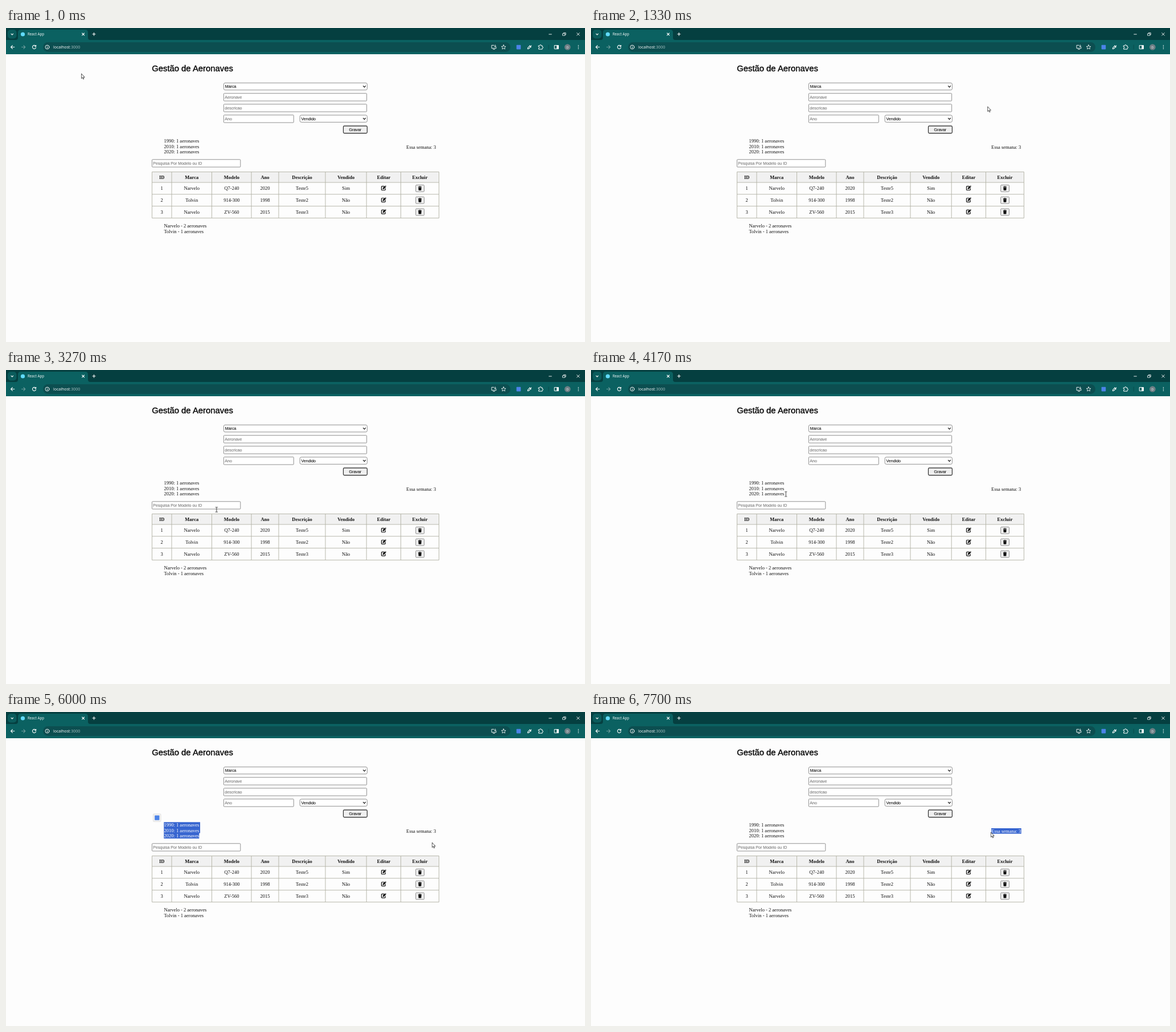
An HTML page that plays this animation: 1017x551 px, repeating every 8000 ms.

```html
<!DOCTYPE html>
<html lang="pt">
<head>
<meta charset="utf-8">
<title>Gestão de Aeronaves</title>
<style>
html, body { margin: 0; width: 100%; height: 100%; overflow: hidden; background: #fdfdfd; }
svg { display: block; }
#stage { width: 1017px; height: 551px; }
text { white-space: pre; }
.ui { font-family: "Open Sans", "Noto Sans", sans-serif; fill: #fff; }
.serif { font: 8.5px "Liberation Serif", "Times New Roman", serif; fill: #111; }
.form { font: 7.07px "Liberation Sans", Arial, sans-serif; fill: #111; stroke: #111; stroke-width: .1; }
.form .hint { fill: #777; stroke: #777; }
.title { font: 14.84px "Liberation Sans", Arial, sans-serif; fill: #000; stroke: #000; stroke-width: .35; }
.mid { text-anchor: middle; }
.head { font-weight: bold; }
.line { fill: none; stroke: #fff; stroke-linecap: round; stroke-linejoin: round; }
.field { fill: #fff; stroke: #858585; stroke-width: .9; }
.picked { fill: #fff; }

#pointer, #arrow, #beam, #chip, .sel, #block { animation: 8s linear infinite; }
#pointer { animation-name: travel; }
#arrow { animation-name: arrow; animation-timing-function: step-end; }
#beam { animation-name: beam; animation-timing-function: step-end; }
#chip { animation-name: chip; animation-timing-function: step-end; }
#block { animation-name: block; animation-timing-function: step-end; }
#sel1 { animation-name: sel1; }
#sel2 { animation-name: sel2; }
#sel3 { animation-name: sel3; }
#week { animation-name: week; }

@keyframes travel {
  0%, .375% { transform: translate(132px, 80px); animation-timing-function: cubic-bezier(.45, 0, .65, .9); }
  7.875% { transform: translate(584px, 125px); animation-timing-function: ease-out; }
  10.375%, 12.5% { transform: translate(613px, 128px); animation-timing-function: ease-in-out; }
  20.375%, 24.125% { transform: translate(766px, 146px); animation-timing-function: ease-in; }
  26.625% { transform: translate(778px, 129px); animation-timing-function: ease-out; }
  30%, 32.875% { transform: translate(786px, 126px); animation-timing-function: cubic-bezier(.45, 0, .65, .9); }
  40.875% { transform: translate(370px, 245px); animation-timing-function: ease-out; }
  42.875%, 43.375% { transform: translate(352px, 240px); animation-timing-function: ease-in-out; }
  53.375%, 53.75% { transform: translate(342px, 217px); }
  58.5% { transform: translate(279px, 198px); animation-timing-function: ease-out; }
  59.125%, 64.625% { transform: translate(273px, 195px); animation-timing-function: ease-in-out; }
  73.375%, 75% { transform: translate(748px, 229px); animation-timing-function: ease-in-out; }
  80% { transform: translate(764px, 222px); animation-timing-function: ease-in-out; }
  85%, 85.5% { transform: translate(757px, 209px); }
  90.875%, 93.375% { transform: translate(703px, 210px); }
  93.75%, 100% { transform: translate(702px, 211px); }
}
@keyframes arrow {
  0% { opacity: 1; }
  40% { opacity: 0; }
  45% { opacity: 1; }
  51.5% { opacity: 0; }
  58.5% { opacity: 1; }
  85% { opacity: 0; }
  90.5%, 100% { opacity: 1; }
}
@keyframes beam {
  0% { opacity: 0; }
  40% { opacity: 1; }
  45% { opacity: 0; }
  51.5% { opacity: 1; }
  58.5% { opacity: 0; }
  85% { opacity: 1; }
  90.5%, 100% { opacity: 0; }
}
@keyframes chip {
  0% { opacity: 0; }
  62.5% { opacity: 1; }
  84.5%, 100% { opacity: 0; }
}
@keyframes block {
  0% { opacity: 0; }
  53.75% { opacity: 1; }
  84.5%, 100% { opacity: 0; }
}
@keyframes sel3 {
  0%, 53.75% { transform: translateX(65px); }
  55.37% { transform: translateX(43px); }
  55.375%, 100% { transform: none; }
}
@keyframes sel2 {
  0%, 55.37% { transform: translateX(65px); }
  55.375% { transform: translateX(43px); }
  57% { transform: translateX(21px); }
  57.005%, 100% { transform: none; }
}
@keyframes sel1 {
  0%, 57% { transform: translateX(65px); }
  57.005% { transform: translateX(21px); }
  58.5%, 100% { transform: none; }
}
@keyframes week {
  0%, 85.5% { transform: translateX(53px); }
  90.5%, 100% { transform: none; }
}
</style>
</head>
<body>
<svg id="stage" viewBox="0 0 1017 551">
  <defs>
    <g id="caret"><path d="M-2.3 -1.2 0 1.2 2.3 -1.2" fill="none" stroke="#111" stroke-width="1.2"/></g>
    <g id="edit">
      <path d="M1-3.2H-2.8Q-3.8-3.2-3.8-2.2V2.6Q-3.8 3.6-2.8 3.6H2Q3 3.6 3 2.6V.4" fill="none" stroke="#111" stroke-width="1.2"/>
      <path d="M-1.8 1.8-1.4-.5 2.1-4 4.2-1.9.6 1.5Z" fill="#111"/>
      <path d="M2.7-4.4Q3.3-4.9 4-4.2T4.6-2.4Z" fill="#111"/>
    </g>
    <g id="trash">
      <rect x="-7.3" y="-5.8" width="14.8" height="11.8" rx="1.2" fill="#efefef" stroke="#858585" stroke-width=".9"/>
      <path d="M-3.1-3.1H-1.2L-.7-3.8H.7L1.2-3.1H3.1V-2.2H-3.1ZM-2.7-1.8H2.7L2.4 3Q2.3 3.7 1.6 3.7H-1.6Q-2.3 3.7-2.4 3Z" fill="#111"/>
    </g>
    <g id="years">
      <text x="277.5" y="201">1990: 1 aeronaves</text>
      <text x="277.5" y="210.6">2010: 1 aeronaves</text>
      <text x="277.5" y="220">2020: 1 aeronaves</text>
    </g>
    <text id="total" x="703.3" y="211.6">Essa semana: 3</text>
    <clipPath id="blockClip">
      <rect class="sel" id="sel1" x="276.5" y="193" width="65" height="9.8"/>
      <rect class="sel" id="sel2" x="276.5" y="202.8" width="65" height="9.6"/>
      <rect class="sel" id="sel3" x="276.5" y="212.4" width="65" height="10"/>
    </clipPath>
    <clipPath id="weekClip"><rect class="sel" id="week" x="703" y="203" width="53" height="12"/></clipPath>
  </defs>

  <rect width="1017" height="551" fill="#fdfdfd"/>

  <!-- browser window -->
  <rect width="1017" height="46" fill="#0b6161"/>
  <rect width="1017" height="21" fill="#053f40"/>
  <rect x="3" y="3" width="15.5" height="15.5" rx="5" fill="#0b5c5c"/>
  <path d="M17 21Q21 21 21 17V8Q21 3 26 3H139Q144 3 144 8V17Q144 21 148 21Z" fill="#0b6161"/>
  <circle cx="29.5" cy="11" r="3.6" fill="#61dafb"/>
  <rect x="65" y="25" width="821" height="17" rx="8.5" fill="#0c4e50"/>
  <g class="ui">
    <text x="38" y="13.3" font-size="6.2">React App</text>
    <text x="83" y="36" font-size="7">localhost<tspan fill="#a9c4c4">:3000</tspan></text>
  </g>
  <g class="line" stroke-width="1.1">
    <path d="M9 10.2 10.8 12 12.6 10.2"/>
    <path d="M133.7 9 137.5 12.8M137.5 9 133.7 12.8M152 10.7H157M154.5 8.2V13.2"/>
    <path d="M953.7 11H958.3M1002.7 8.5 1007.3 13.1M1007.3 8.5 1002.7 13.1" stroke-width=".9"/>
    <path d="M978 9.8H981.8V13.2H978ZM979.3 9.5V8.4H983.2V12H982" stroke-width=".8"/>
    <path d="M14.8 33.5H8.8M11.4 30.7 8.6 33.5 11.4 36.3"/>
    <path d="M27.5 33.5H33.5M30.9 30.7 33.7 33.5 30.9 36.3" stroke="#6d9c9c" style="stroke:#6d9c9c"/>
    <path d="M52.2 31.8A3.1 3.1 0 1 0 52.6 34.2M52.7 30.2V32.3H50.5"/>
    <circle cx="72.5" cy="33.5" r="3.5" stroke-width=".9"/>
    <path d="M72.5 33.3V35.3M72.5 31.7V31.8" stroke-width=".9"/>
    <path d="M857 30.3H853V35.6H861V33.8M855.5 37.4H858.6M859.3 29.8V33M857.8 31.8 859.3 33.3 860.8 31.8" stroke-width=".9"/>
    <path d="M874 29.6 875.1 32.2 877.9 32.4 875.8 34.3 876.4 37 874 35.6 871.6 37 872.2 34.3 870.1 32.4 872.9 32.2Z" stroke-width=".8"/>
    <path d="M916.3 36.7 916.7 34.7 920 31.4 921.6 33 918.3 36.3ZM919.5 30.8 922.2 33.5M921.4 32.2 922.7 30.8" stroke-width="1.1"/>
    <path d="M935.6 31H937.6Q937.6 29.4 938.8 29.4T940 31H942V33Q943.4 33 943.4 34.2T942 35.4V37.2H935.6V35.2Q937 35.2 937 34T935.6 32.8Z" stroke-width="1"/>
    <path d="M963.6 30.5H970.4V36.7H963.6Z" stroke-width="1"/>
  </g>
  <rect x="967.2" y="30.5" width="3.4" height="6.2" fill="#fff"/>
  <rect x="896.6" y="29.8" width="7.6" height="7.6" rx=".8" fill="#4c83e8"/>
  <rect x="952.7" y="29.5" width=".9" height="8" fill="#0a4a4b"/>
  <circle cx="986.3" cy="33.5" r="5.3" fill="#6f7f86"/>
  <text class="ui mid" x="986.3" y="35.5" font-size="5.5">D</text>
  <g fill="#fff"><circle cx="1005.4" cy="30.7" r=".8"/><circle cx="1005.4" cy="33.5" r=".8"/><circle cx="1005.4" cy="36.3" r=".8"/></g>

  <!-- form -->
  <text class="title" x="256.2" y="76.4">Gestão de Aeronaves</text>
  <g class="field">
    <rect x="382.4" y="96.4" width="252" height="12.4" rx="2.5"/>
    <rect x="382.4" y="114.7" width="251.2" height="13.3" rx="1"/>
    <rect x="382.4" y="133.7" width="251.2" height="13.3" rx="1"/>
    <rect x="382.4" y="152.7" width="122.9" height="13.3" rx="1"/>
    <rect x="516.2" y="152.9" width="118.2" height="12.4" rx="2.5"/>
    <rect x="256.5" y="230.8" width="155.3" height="13.2" rx="1"/>
  </g>
  <rect x="592.5" y="171.9" width="41.9" height="12.7" rx="1.8" fill="#efefef" stroke="#222" stroke-width="1.1"/>
  <use href="#caret" x="629.5" y="102.6"/>
  <use href="#caret" x="629.5" y="159.1"/>
  <g class="form">
    <text x="384.8" y="105">Marca</text>
    <text class="hint" x="384.3" y="124">Aeronave</text>
    <text class="hint" x="384.3" y="143">descricao</text>
    <text class="hint" x="384.3" y="162">Ano</text>
    <text x="518.5" y="161.7">Vendido</text>
    <text class="mid" x="613.4" y="180.7">Gravar</text>
    <text class="hint" x="258.3" y="240">Pesquisa Por Modelo ou ID</text>
  </g>

  <!-- totals and table -->
  <g class="serif">
    <use href="#years"/>
    <use href="#total"/>
    <text x="277.5" y="350">Narvelo - 2 aeronaves</text>
    <text x="277.5" y="359.5">Tolvin - 1 aeronaves</text>
  </g>
  <rect x="256.5" y="252.5" width="504" height="18.5" fill="#f1f1f1"/>
  <path d="M256.5 252.5H760.5V333.5H256.5ZM256.5 271H760.5M256.5 291.8H760.5M256.5 312.6H760.5M291 252.5V333.5M361.5 252.5V333.5M431 252.5V333.5M479 252.5V333.5M561 252.5V333.5M633.2 252.5V333.5M693.5 252.5V333.5" fill="none" stroke="#b2b2a4" stroke-width=".9"/>
  <g id="table" class="serif mid"></g>

  <!-- selections -->
  <g id="block">
    <g clip-path="url(#blockClip)">
      <path d="M277.3 193.3H341V212.4H339.3V222H277.3Z" fill="#3765d0"/>
      <g class="serif picked"><use href="#years"/></g>
    </g>
  </g>
  <g clip-path="url(#weekClip)">
    <rect x="703" y="204" width="52.8" height="9.6" fill="#3765d0"/>
    <g class="serif picked"><use href="#total"/></g>
  </g>
  <g id="chip">
    <rect x="258.5" y="178.8" width="13.6" height="13.6" rx="1.2" fill="#f1f1f1" stroke="#dcdcdc" stroke-width=".7"/>
    <rect x="261.2" y="181.5" width="8.2" height="8.2" rx=".8" fill="#4c83e8"/>
  </g>

  <g id="pointer">
    <path id="arrow" d="M.4 0V8.6L2.3 6.9 3.6 9.8 4.9 9.2 3.6 6.4H6.2Z" fill="#fff" stroke="#222" stroke-width=".8" stroke-linejoin="round"/>
    <path id="beam" d="M-2-4.2H-.6L0-3.7.6-4.2H2M0-3.7V3.7M-2 4.2H-.6L0 3.7.6 4.2H2" fill="none" stroke="#222" stroke-width=".9"/>
  </g>
</svg>
<script>
const NS = "http://www.w3.org/2000/svg";
const table = document.getElementById("table");
const centers = [273.7, 326.2, 396.4, 455, 520, 597.2, 663.5, 727];
const rows = [
  ["ID", "Marca", "Modelo", "Ano", "Descrição", "Vendido", "Editar", "Excluir"],
  ["1", "Narvelo", "Q7-240", "2020", "Teste5", "Sim"],
  ["2", "Tolvin", "914-300", "1998", "Teste2", "Não"],
  ["3", "Narvelo", "ZV-560", "2015", "Teste3", "Não"]
];

function add(tag, attrs, text = "") {
  const el = document.createElementNS(NS, tag);
  for (const key in attrs) el.setAttribute(key, attrs[key]);
  el.textContent = text;
  table.append(el);
}

rows.forEach((cells, r) => {
  const y = r ? 281.3 + (r - 1) * 20.8 : 261.8;
  cells.forEach((cell, c) =>
    add("text", { x: centers[c], y: y + 2.8, class: r ? "" : "head" }, cell));
  if (r) {
    add("use", { href: "#edit", x: centers[6] - .2, y: y - .4 });
    add("use", { href: "#trash", x: centers[7], y });
  }
});
</script>
</body>
</html>
```
